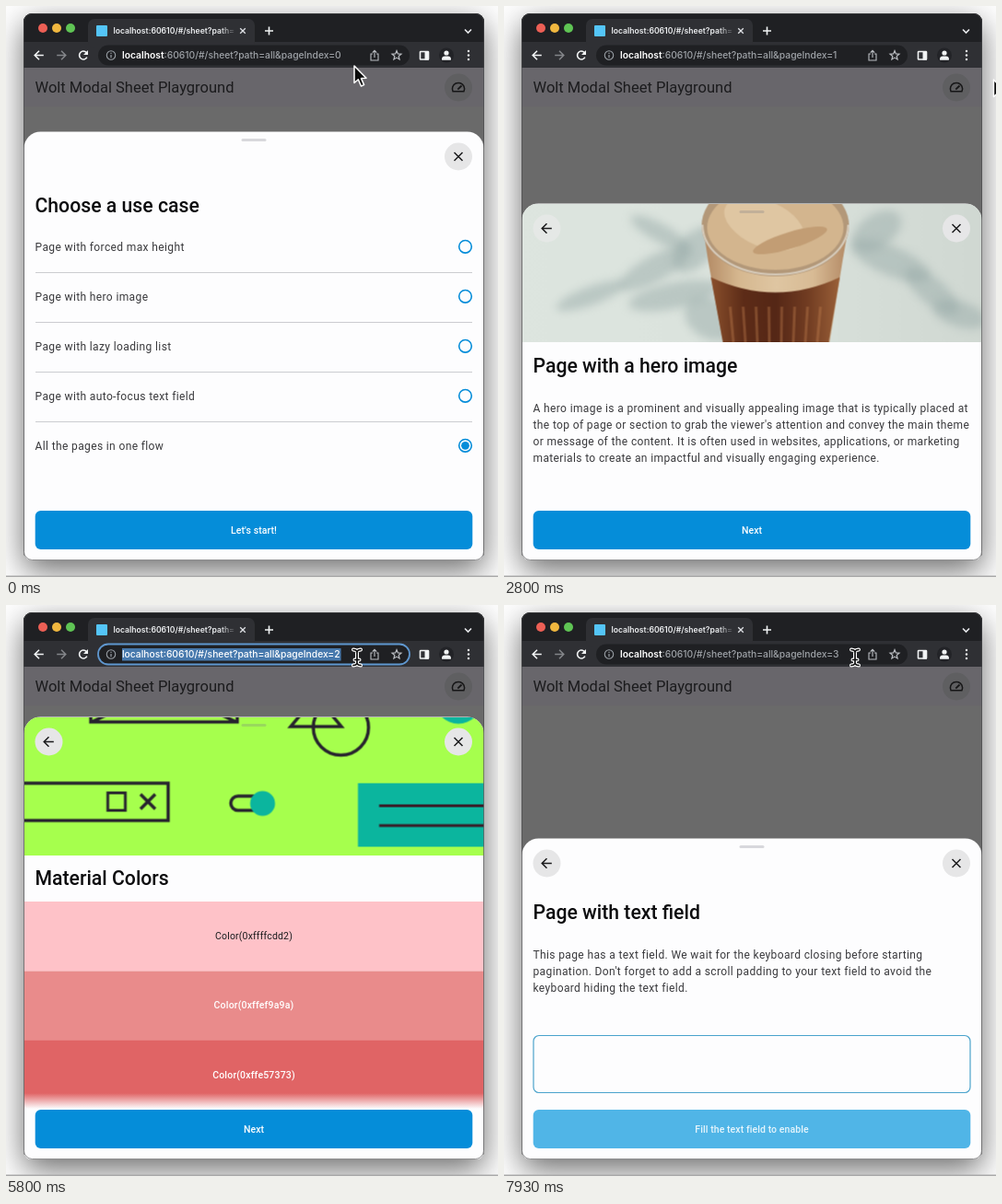
Write an HTML page with a canvas that moves like this. It is 534 by 620 pixels and loops after 8000 ms.

```html
<!DOCTYPE html>
<html lang="en">
<head>
<meta charset="utf-8">
<title>Modal sheet deep links</title>
<style>
html, body { margin: 0; width: 100%; height: 100%; overflow: hidden; background: #fff; }
canvas { display: block; width: 534px; height: 620px; }
</style>
</head>
<body>
<canvas id="stage"></canvas>
<script>
const W = 534, H = 620, LOOP = 8000;
const L = 19.5, BOTTOM = 602;
const BLUE = '#058dd9', INK = '#1b1b1d', WHITE = '#fff', BAR = '#2f3034';
const UI = 'Inter, "Open Sans", sans-serif', APP = 'Roboto, sans-serif';
const TOPS = [136.5, 214.5, 121.5, 253.5];

// One entry per visit to the address bar, in ms.
const VISITS = [
  { select: 330, caret: 870, erase: 1270, type: 1470, enter: 1960, slide: 2270 },
  { select: 3200, caret: 3800, erase: 4200, type: 4470, enter: 4930, slide: 5117 },
  { select: 5730, caret: 6270, erase: 6530, type: 6730, enter: 7060, slide: 7200 }
];

const canvas = document.getElementById('stage');
const dpr = window.devicePixelRatio || 1;
canvas.width = W * dpr;
canvas.height = H * dpr;
let c = canvas.getContext('2d');

const clamp = v => Math.max(0, Math.min(1, v));
const span = (t, a, b) => clamp((t - a) / (b - a));
const mix = (a, b, k) => a + (b - a) * k;

// cubic-bezier(.4, 0, .2, 1)
function ease(x) {
  if (x <= 0 || x >= 1) return clamp(x);
  let lo = 0, hi = 1;
  for (let i = 0; i < 20; i++) {
    const s = (lo + hi) / 2, q = 1 - s;
    if (1.2 * q * q * s + 0.6 * q * s * s + s ** 3 < x) lo = s; else hi = s;
  }
  return 3 * (1 - lo) * lo * lo + lo ** 3;
}

function box(x, y, w, h, r, fill, stroke, lw = 1) {
  c.beginPath();
  c.roundRect(x, y, w, h, r);
  if (fill) { c.fillStyle = fill; c.fill(); }
  if (stroke) { c.strokeStyle = stroke; c.lineWidth = lw; c.stroke(); }
}

function disc(x, y, r, fill, stroke, lw = 1) {
  c.beginPath();
  c.arc(x, y, r, 0, 7);
  if (fill) { c.fillStyle = fill; c.fill(); }
  if (stroke) { c.strokeStyle = stroke; c.lineWidth = lw; c.stroke(); }
}

function oval(x, y, rx, ry, rot, fill) {
  c.beginPath();
  c.ellipse(x, y, rx, ry, rot, 0, 7);
  c.fillStyle = fill;
  c.fill();
}

// Each argument after the width is a polyline [x, y, x, y, ...].
function lines(color, lw, ...paths) {
  c.strokeStyle = color;
  c.lineWidth = lw;
  c.beginPath();
  for (const p of paths)
    for (let i = 0; i < p.length; i += 2) c[i ? 'lineTo' : 'moveTo'](p[i], p[i + 1]);
  c.stroke();
}

function shape(fill, ...p) {
  c.beginPath();
  for (let i = 0; i < p.length; i += 2) c.lineTo(p[i], p[i + 1]);
  c.closePath();
  c.fillStyle = fill;
  c.fill();
}

const cross = (x, y, r, color, lw) =>
  lines(color, lw, [x - r, y - r, x + r, y + r], [x + r, y - r, x - r, y + r]);

const arrow = (x, y, r, dir, color, lw) =>
  lines(color, lw, [x - r * dir, y, x + r * dir, y], [x, y - r, x + r * dir, y, x, y + r]);

function text(s, x, y, font, color, spacing = 0, align = 'left') {
  c.font = font;
  c.fillStyle = color;
  c.letterSpacing = spacing + 'px';
  c.textAlign = align;
  c.fillText(s, x, y);
  return c.measureText(s).width;
}

const heading = (s, y) => text(s, 31.5, y, `500 21.2px ${APP}`, '#0c0c0e');
const body = (s, y) => text(s, 31.5, y, `12px ${APP}`, '#39393c', 0.375);

function gradient(x0, x1, ...colors) {
  const g = c.createLinearGradient(x0, 0, x1, 0);
  colors.forEach((color, i) => g.addColorStop(i / (colors.length - 1), color));
  return g;
}

function layer(w, h, paint) {
  const el = document.createElement('canvas'), main = c;
  el.width = w * dpr;
  el.height = h * dpr;
  c = el.getContext('2d');
  c.scale(dpr, dpr);
  paint();
  c = main;
  return el;
}

// Soft stand-in for the photo of a coffee glass.
const hero = layer(499, 150, () => {
  box(0, 0, 499, 150, 0, gradient(0, 499, '#dde5df', '#dbe3dd', '#d0d8d2'));
  c.filter = `blur(${5 * dpr}px)`;
  const leaves = [
    [75, 100, 40, 10, -0.35], [145, 70, 44, 14, -0.5], [165, 100, 50, 14, -0.2],
    [150, 32, 36, 10, 0.5], [188, 50, 30, 18, -0.8], [205, 125, 30, 22, 0.5],
    [385, 30, 30, 18, -0.6], [400, 62, 46, 16, 0.4], [445, 95, 36, 14, 0.7],
    [475, 120, 30, 14, 0.3]
  ];
  for (const l of leaves) oval(...l, 'rgba(150,170,167,.48)');
  c.filter = 'none';

  shape(gradient(196, 356, '#b08661', '#d6b890', '#dfc6a2', '#d8bb95', '#b08661'),
    196, 22, 202, 62, 218, 150, 334, 150, 348, 62, 355, 22);
  c.beginPath();
  c.moveTo(205, 80);
  c.quadraticCurveTo(275, 113, 345, 80);
  c.lineTo(333, 150);
  c.lineTo(218, 150);
  c.fillStyle = gradient(205, 345, '#8a4f2c', '#5d2c18', '#552716', '#713c22', '#9a6038');
  c.fill();
  for (let i = 0; i < 8; i++) {
    const x = 226 + i * 14;
    lines('rgba(190,125,78,.4)', 3, [x, 112, x + (275 - x) * 0.07, 150]);
  }
  oval(275, 24, 80, 55, 0, '#b39879');
  oval(275, 26, 74, 46, 0, '#d3b58e');
  oval(263, 22, 46, 25, 0.4, '#dfc6a2');
  oval(291, 40, 42, 9, -0.3, '#c29d74');
  c.beginPath();
  c.ellipse(275, 23, 79, 54, 0, 0, Math.PI);
  c.strokeStyle = '#d8cdbd';
  c.lineWidth = 2;
  c.stroke();
});

const artwork = layer(499, 150, () => {
  const dark = '#27232e', teal = '#0bb59e';
  c.fillStyle = '#a6ff4d';
  c.fillRect(0, 0, 499, 150);
  c.translate(-19.5, -121.5);
  lines(dark, 3.5, [92, 115, 92, 127, 251, 127, 251, 115], [93, 127, 108, 120], [250, 127, 235, 120]);
  lines(dark, 3.5, [319, 120, 309, 132, 364, 132, 354, 120]);
  disc(363.5, 133, 30, null, dark, 3.5);
  disc(491, 104, 25, teal);
  lines(dark, 3.5, [15, 193.5, 176, 193.5, 176, 234, 15, 234]);
  box(110.5, 204, 19, 19, 0, null, dark, 3);
  cross(154, 213.5, 8, dark, 3.5);
  box(244, 207.5, 40, 15.5, 8, null, dark, 3.5);
  disc(278.5, 215.5, 13.5, teal);
  box(382, 193.5, 140, 69, 0, teal);
  lines('#3a1a26', 3, [405, 218, 520, 218], [405, 239.5, 520, 239.5]);
});

const paintImage = (img, top) => c.drawImage(img, L, top, 499, 150);

// Page contents; y is the top edge of the sheet.
const PAGES = [
  {
    button: "Let's start!",
    paint(y) {
      heading('Choose a use case', y + 87.5);
      const items = ['Page with forced max height', 'Page with hero image',
        'Page with lazy loading list', 'Page with auto-focus text field',
        'All the pages in one flow'];
      items.forEach((s, i) => {
        const row = y + 124.8 + i * 54;
        body(s, row + 5);
        disc(498.5, row, 6.8, null, BLUE, 1.6);
        if (i === 4) disc(498.5, row, 4.4, BLUE);
        else lines('#cbccd0', 1, [32, y + 153 + i * 54, 506, y + 153 + i * 54]);
      });
    }
  },
  {
    button: 'Next', back: true,
    paint(y) {
      paintImage(hero, y);
      heading('Page with a hero image', y + 183.5);
      [
        'A hero image is a prominent and visually appealing image that is typically placed at',
        "the top of page or section to grab the viewer's attention and convey the main theme",
        'or message of the content. It is often used in websites, applications, or marketing',
        'materials to create an impactful and visually engaging experience.'
      ].forEach((s, i) => body(s, y + 226 + i * 18));
    }
  },
  {
    button: 'Next', back: true,
    paint(y) {
      paintImage(artwork, y);
      heading('Material Colors', y + 182.5);
      const rows = [['#fec2c8', 'ffffcdd2', INK, 400], ['#e98b8b', 'ffef9a9a', WHITE, 500],
        ['#e06465', 'ffe57373', WHITE, 500]];
      rows.forEach(([fill, hex, ink, weight], i) => {
        const top = y + 200.5 + i * 75.4;
        box(L, top, 499, 75.6, 0, fill);
        text(`Color(0x${hex})`, 269, top + 41, `${weight} 10.5px ${APP}`, ink, 0.18, 'center');
      });
      const fade = c.createLinearGradient(0, 530, 0, 547);
      fade.addColorStop(0, 'rgba(253,253,254,0)');
      fade.addColorStop(1, '#fdfdfe');
      box(L, 530, 499, 72, 0, fade);
    }
  },
  {
    button: 'Fill the text field to enable', back: true, disabled: true,
    paint(y) {
      heading('Page with text field', y + 87.5);
      [
        'This page has a text field. We wait for the keyboard closing before starting',
        "pagination. Don't forget to add a scroll padding to your text field to avoid the",
        'keyboard hiding the text field.'
      ].forEach((s, i) => body(s, y + 130 + i * 18));
      box(32, y + 214, 474, 62, 6, null, '#4aa3cc', 1.2);
    }
  }
];

function content(page, y, dx, alpha) {
  if (alpha <= 0) return;
  c.save();
  c.globalAlpha = alpha;
  c.translate(dx, 0);
  page.paint(y);
  c.restore();
}

function controls(page, y, alpha) {
  if (alpha <= 0) return;
  c.save();
  c.globalAlpha = alpha;
  box(31.7, 548, 474.6, 42, 6, page.disabled ? '#50b5e7' : BLUE);
  disc(491, y + 27, 15, '#e6e6e7');
  cross(491, y + 27, 4.5, INK, 1.5);
  if (page.back) {
    disc(46.5, y + 27, 15, page === PAGES[1] ? 'rgba(232,234,232,.75)' : '#e6e6e7');
    arrow(46.5, y + 27, 5.3, -1, INK, 1.5);
  }
  // The label stays white while the button fades over a white sheet.
  c.globalAlpha = 1;
  text(page.button, 269, 572.7, `500 10.5px ${APP}`, page.disabled ? '#e6f5fc' : WHITE, 0.075, 'center');
  c.restore();
}

function sheet(t) {
  const to = VISITS.filter(v => t >= v.slide).length;
  const from = Math.max(0, to - 1);
  const e = to ? t - VISITS[to - 1].slide : 1e4;
  const y = mix(TOPS[from], TOPS[to], ease(span(e, 0, 300)));
  const slide = ease(span(e, 50, 350));
  c.save();
  c.beginPath();
  c.roundRect(L, y, 499, BOTTOM - y, [18, 18, 8, 8]);
  c.fillStyle = '#fdfdfe';
  c.fill();
  c.clip();
  if (e < 350) content(PAGES[from], y, -150 * slide, 1 - span(e, 50, 170));
  content(PAGES[to], y, 150 * (1 - slide), span(e, 170, 350));
  if (e < 350) controls(PAGES[from], y, 1 - span(e, 0, 104));
  controls(PAGES[to], y, span(e, 104, 300));
  box(255.5, y + 7.5, 27, 3, 1.5, 'rgba(120,120,130,.28)');
  c.restore();
}

const icon = (x, y, s) => box(x - s / 2, y - s / 2, s, s, 1, '#54c5f8');

function desktop() {
  c.fillStyle = WHITE;
  c.fillRect(0, 0, W, H);
  c.save();
  c.shadowColor = 'rgba(0,0,0,.58)';
  c.shadowBlur = 34 * dpr;
  c.shadowOffsetY = 11 * dpr;
  box(19, 8, 500, 594, 9, '#202124');
  c.restore();
  box(0, 618.5, W, 1.5, 0, '#a9a9a9');
}

function frame() {
  c.save();
  c.beginPath();
  c.roundRect(19, 8, 500, 594, 9);
  c.clip();
  box(19, 8, 500, 31, 0, '#1f2023');
  box(19, 39, 500, 28, 0, BAR);
  box(89, 14, 181, 32, 7, BAR);
  box(19, 67, 500, 535, 0, '#6a6a6a');
  box(19, 67, 500, 42.5, 0, '#68666b');
  c.restore();

  ['#ec5f55', '#f0b73f', '#5fc454'].forEach((f, i) => disc(40 + i * 15, 24, 5, f));
  icon(104, 27, 12);
  text('localhost:60610/#/sheet?path=', 116.5, 30.3, `600 8.65px ${UI}`,
    gradient(232, 250, '#eceef0', 'rgba(236,238,240,0)'));
  cross(257, 27, 2.8, '#dfe1e5', 1.3);
  lines('#f1f3f4', 1.6, [281, 27, 290, 27], [285.5, 22.5, 285.5, 31.5]);
  lines('#e8eaed', 1.6, [498, 25.5, 501.5, 29, 505, 25.5]);

  arrow(36, 53.5, 4.8, -1, '#f1f3f4', 1.6);
  arrow(60, 53.5, 4.8, 1, '#84868a', 1.5);
  c.beginPath();
  c.arc(84, 53.5, 4.4, 0.5, 5.6);
  c.strokeStyle = '#f1f3f4';
  c.lineWidth = 1.6;
  c.stroke();
  shape('#f1f3f4', 89, 48, 89, 53, 84, 53);
  box(449.5, 49.5, 9, 8.5, 0.5, null, '#f1f3f4', 1.6);
  box(454.5, 49, 4.5, 9.5, 0, '#f1f3f4');
  disc(478, 53.5, 8, '#222327');
  disc(478, 51, 2.6, '#f1f3f4');
  box(473, 54.5, 10, 4.3, [4, 4, 1, 1], '#f1f3f4');
  for (const y of [49, 53.5, 58]) disc(502, y, 1.2, '#f1f3f4');

  text('Wolt Modal Sheet Playground', 31.5, 94, `16.5px ${APP}`, INK);
  disc(491, 88.5, 15, '#5f5f61');
  c.beginPath();
  c.arc(491, 90, 6.6, 2.7, 6.72);
  c.closePath();
  c.strokeStyle = '#161617';
  c.lineWidth = 1.5;
  c.stroke();
  lines('#161617', 1.8, [490.3, 90.7, 494.5, 86.5]);
}

const FIELD = `500 10.3px ${UI}`;
const REST = ':60610/#/sheet?path=all&pageIndex=';

function address(tail, x, y, dim, weight = 500) {
  const w = text('localhost', x, y, `${weight} 10.3px ${UI}`, WHITE);
  return x + w + text(REST + tail, x + w, y, FIELD, dim);
}

function pill(index, mode) {
  const active = mode !== 'idle';
  box(100, 42.5, 338, 22, 11, '#1f2023', active ? '#5f97cf' : null, 1.8);
  disc(114, 53.5, 4.7, null, '#9aa0a6', 1.1);
  lines('#9aa0a6', 1.2, [114, 53, 114, 56.2], [114, 50.7, 114, 51.9]);
  if (mode === 'select') {
    c.font = FIELD;
    c.letterSpacing = '0px';
    box(126, 47, c.measureText('localhost' + REST + index).width + 1, 13.5, 0, '#4779ad');
  }
  const end = address(index, 126, 57.2, mode === 'select' ? WHITE : '#9fa3a8', active ? 500 : 600);
  if (mode === 'caret') lines(WHITE, 1, [end + 1, 47.5, end + 1, 60]);
  lines('#b9bcc1', 1.1, [398, 52, 396, 52, 396, 59, 404, 59, 404, 52, 402, 52],
    [400, 56, 400, 48.5], [397.7, 50.7, 400, 48.4, 402.3, 50.7]);
  c.beginPath();
  for (let i = 0; i < 10; i++) {
    const a = i * Math.PI / 5 - Math.PI / 2, r = i % 2 ? 2.3 : 5.2;
    c.lineTo(424 + r * Math.cos(a), 53.8 + r * Math.sin(a));
  }
  c.closePath();
  c.lineWidth = 1.2;
  c.stroke();
}

function suggestions(tail) {
  c.save();
  c.shadowColor = 'rgba(0,0,0,.45)';
  c.shadowBlur = 8 * dpr;
  c.shadowOffsetY = 2 * dpr;
  box(96, 40, 345.5, 87, 6, '#202124');
  c.restore();
  box(96, 67, 345.5, 27, 0, '#37383c');
  box(96, 67, 2.5, 27, [0, 2, 2, 0], '#6c9fe0');
  icon(114, 53.5, 12);
  icon(114, 80.5, 12);
  const end = address(tail, 134.5, 57.2, '#9a9ea4');
  lines('#e8eaed', 1, [end + 1, 47.5, end + 1, 60]);
  const url = 'localhost' + REST + tail;
  text(url, 134.5, 84, `700 10.4px ${UI}`, WHITE);
  text(url, 134.5, 111, FIELD, WHITE);
  cross(426.5, 80.5, 3.4, '#c3c6ca', 1.3);
  disc(113, 106.3, 2.9, null, '#a5a8ad', 1.2);
  lines('#a5a8ad', 1.3, [115.2, 108.5, 118, 111.3]);
}

function addressBar(t) {
  const n = VISITS.findIndex(v => t >= v.select && t < v.enter);
  if (n < 0) return pill(VISITS.filter(v => t >= v.enter).length, 'idle');
  const v = VISITS[n];
  if (t < v.erase) pill(n, t < v.caret ? 'select' : 'caret');
  else suggestions(t < v.type ? '' : String(n + 1));
}

function pointer(x, y) {
  const p = [0, 0, 0, 18.5, 4.3, 14.7, 7.4, 22, 10.6, 20.6, 7.5, 13.6, 13, 13.3];
  const at = p.map((v, i) => v + (i % 2 ? y : x));
  c.lineJoin = 'round';
  shape('#0a0a0a', ...at);
  c.strokeStyle = WHITE;
  c.lineWidth = 1.5;
  c.stroke();
  c.lineJoin = 'miter';
}

function beam(x, y) {
  const parts = [
    [x - 4, y - 8.5, x - 1.5, y - 8, x, y - 6.5, x + 1.5, y - 8, x + 4, y - 8.5],
    [x, y - 6.5, x, y + 6.5],
    [x - 4, y + 8.5, x - 1.5, y + 8, x, y + 6.5, x + 1.5, y + 8, x + 4, y + 8.5],
    [x - 2.5, y + 2.5, x + 2.5, y + 2.5]
  ];
  c.lineCap = 'round';
  lines(WHITE, 4, ...parts);
  lines('#0c0c0c', 1.7, ...parts);
  c.lineCap = 'butt';
}

// An arrow everywhere except over the address field.
function cursor(t) {
  const first = t < 1270;
  if (!first && t < 2700) return;
  const k = first ? ease(span(t, 70, 330)) : ease(span(t, 2800, 3070));
  const x = mix(first ? 378 : 531.5, 381, k);
  const y = mix(first ? 65 : 80, 57, k);
  if (x < 438 && y < 64.5) beam(x, y); else pointer(x, y);
}

function draw(now) {
  const t = now % LOOP;
  c.setTransform(dpr, 0, 0, dpr, 0, 0);
  desktop();
  frame();
  sheet(t);
  addressBar(t);
  box(19.5, 8.5, 499, 593, 9, null, 'rgba(70,70,72,.6)', 1);
  cursor(t);
}

const start = performance.now();
function tick() {
  draw(performance.now() - start);
  requestAnimationFrame(tick);
}
tick();
</script>
</body>
</html>
```
